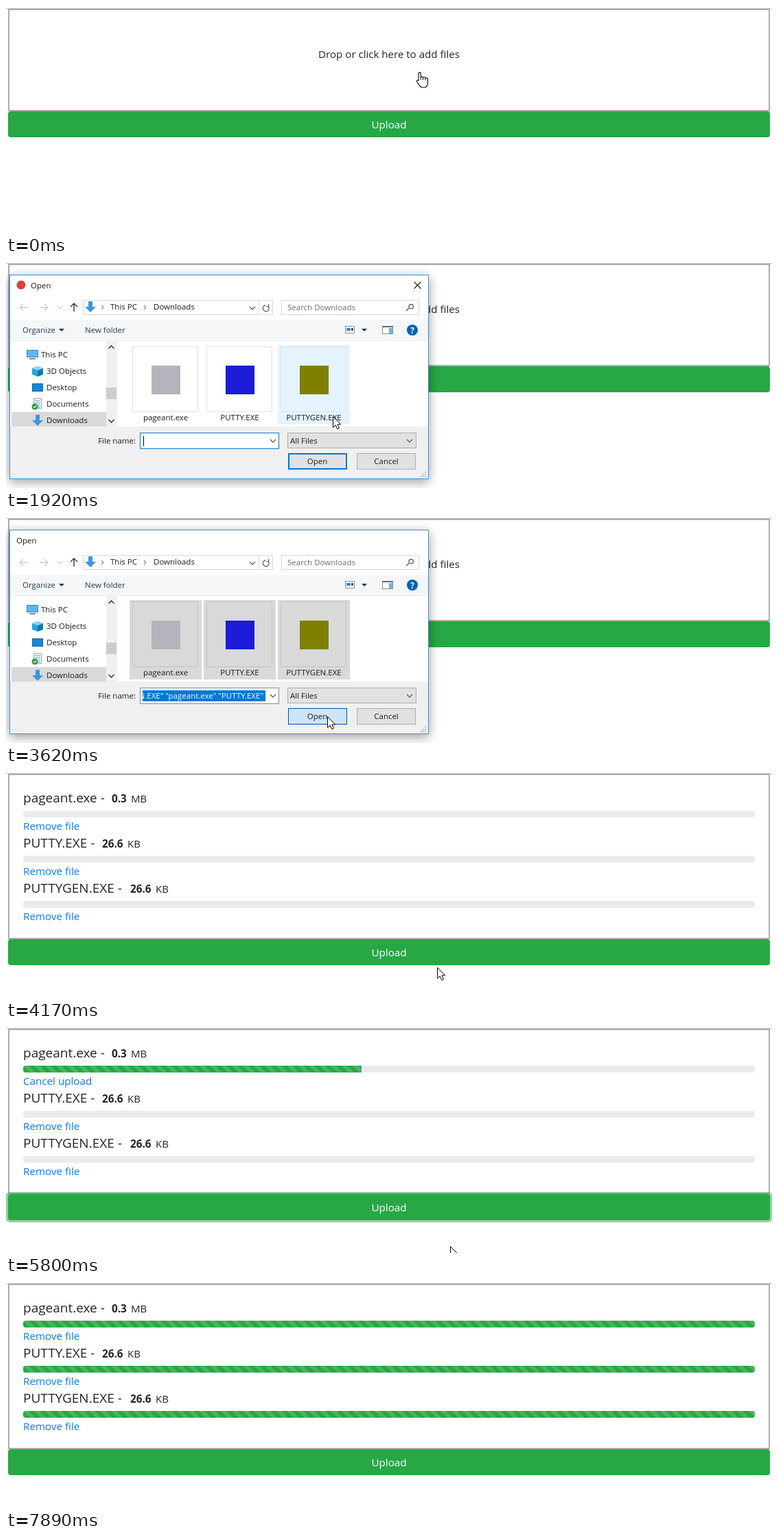
These frames come from a looping animation (1116 px wide and 332 px high, 7.97 s). An HTML page with a canvas:

```html
<!DOCTYPE html>
<html lang="en">
<head>
<meta charset="utf-8">
<title>File upload</title>
<style>
html, body { margin: 0; width: 100%; height: 100%; overflow: hidden; background: #fff; }
canvas { display: block; }
</style>
</head>
<body>
<canvas id="stage" width="1116" height="332"></canvas>
<script>
const LOOP = 7970, STEP = 77.4;
const BLUE = '#0078d7', GREEN = '#28a745', INK = '#1b1b1b', NAVY = '#1e395b';
const stage = document.getElementById('stage').getContext('2d');
const layer = document.createElement('canvas');
layer.width = 611;
layer.height = 299;
const dialogCtx = layer.getContext('2d');
let c = stage;

const clamp = v => Math.max(0, Math.min(1, v));
const ramp = (t, start, length) => clamp((t - start) / length);

// CSS "ease" timing curve
function ease(x) {
  let lo = 0, hi = 1, s = 0.5;
  for (let i = 0; i < 20; i++) {
    s = (lo + hi) / 2;
    const bx = 0.75 * s * (1 - s) + s ** 3;
    if (bx < x) lo = s; else hi = s;
  }
  return 0.3 * s * (1 - s) ** 2 + 3 * s * s * (1 - s) + s ** 3;
}

function rect(x, y, w, h, fill, border, line = 1) {
  if (border) {
    c.fillStyle = border;
    c.fillRect(x, y, w, h);
    x += line; y += line; w -= 2 * line; h -= 2 * line;
  }
  c.fillStyle = fill;
  c.fillRect(x, y, w, h);
}

function round(x, y, w, h, r, fill) {
  c.beginPath();
  c.roundRect(x, y, w, h, r);
  c.fillStyle = fill;
  c.fill();
}

function text(s, x, y, size, color = INK, align = 'left', weight = 400) {
  c.font = `${weight} ${size}px "Open Sans", "Noto Sans", sans-serif`;
  c.fillStyle = color;
  c.textAlign = align;
  c.fillText(s, x, y);
}
const label = (s, x, y, color, align) => text(s, x, y, 11.5, color, align);

function path(d, x, y, stroke, fill, width = 1) {
  const p = new Path2D(d);
  c.save();
  c.translate(x, y);
  c.lineWidth = width;
  if (fill) { c.fillStyle = fill; c.fill(p); }
  if (stroke) { c.strokeStyle = stroke; c.stroke(p); }
  c.restore();
}

function circle(x, y, r, fill) {
  c.beginPath();
  c.arc(x, y, r, 0, 7);
  c.fillStyle = fill;
  c.fill();
}

const chevron = (x, y, color = '#555') => path('M-4 -2L0 2L4 -2', x, y, color, null, 1.2);
const triangle = (x, y) => path('M-4 -2H4L0 2Z', x, y, null, NAVY);
const downArrow = (x, y) => path('M-3 -8H3V0H8L0 8L-8 0H-3Z', x, y, null, '#3a96dd');

// Pointer position over time: [ms, x, y]
const route = [
  [0, 602, 97], [1080, 602, 97], [1238, 578, 98], [1690, 480, 222], [1840, 480, 222],
  [2080, 469, 237], [2640, 469, 237], [2980, 472, 307], [3150, 468, 293], [3640, 468, 293],
  [4250, 634, 287], [4390, 634, 287], [4480, 632, 265], [5560, 632, 265], [5900, 650, 335], [LOOP, 650, 335]
];

function pointerAt(t) {
  const i = Math.max(1, route.findIndex(k => k[0] >= t));
  const [t0, x0, y0] = route[i - 1], [t1, x1, y1] = route[i];
  const k = ramp(t, t0, t1 - t0), s = k * k * (3 - 2 * k);
  return { x: Math.round(x0 + (x1 - x0) * s), y: Math.round(y0 + (y1 - y0) * s) };
}

function drawPointer(p, hand) {
  if (hand) {
    path('M-1.5 12V1.2Q0 -1 1.7 1.2V7Q3.5 5.6 5 7.4Q7 6.2 8.5 8.2Q10.5 7 12 9.5V16Q11.5 20 9 22H2.5' +
      'Q-1 19 -4 13.5Q-4.8 10.5 -1.5 12ZM1.7 7V11M5 7.5V11M8.5 8.5V11.5', p.x + 0.5, p.y, '#000', '#fff', 1.1);
  } else {
    path('M0.5 0.5V16.5L4.2 13L6.8 18.8L9.4 17.6L6.9 12H11.8Z', p.x, p.y, '#000', '#fff');
  }
}

function drawProgress(y, value) {
  c.save();
  c.beginPath();
  c.roundRect(25, y, 1066, 10, 4);
  c.clip();
  rect(25, y, 1066, 10, '#e9ecef');
  c.beginPath();
  c.rect(25, y, 1066 * value, 10);
  c.clip();
  rect(25, y, 1066, 10, GREEN);
  for (let x = 9; x < 1091; x += 16) path('M0 0H8L18 10H10Z', x, y, null, 'rgba(255,255,255,.15)');
  c.restore();
}

// name, size, unit, x of size and unit, "Cancel" link interval, bar start
const files = [
  ['pageant.exe', '0.3', 'MB', 154, 182, 5000, 6200, 5640],
  ['PUTTY.EXE', '26.6', 'KB', 140, 177, 6200, 6560, 6338],
  ['PUTTYGEN.EXE', '26.6', 'KB', 181, 218, 6560, 7150, 6607]
];

function drawPage(t) {
  const listed = t >= 3700, height = listed ? 242 : 150, top = 4 + height;
  rect(0, 0, 1116, 332, '#fff');
  rect(0, 3, 1116, 1, '#c4c4c4');
  rect(3, 4, 1110, height, '#fff', '#adadad', 2);
  if (listed) {
    files.forEach(([name, size, unit, sizeX, unitX, from, to, start], i) => {
      const y = 66 * i;
      text(name + ' -', 25, y + 46, 19, '#212529', 'left', 500);
      text(size, sizeX, y + 46, 15.3, '#212529', 'left', 700);
      text(unit, unitX, y + 46, 15, '#212529');
      drawProgress(y + 58, t < start ? 0 : ease(ramp(t, start, 600)));
      text(t >= from && t < to ? 'Cancel upload' : 'Remove file', 25, y + 86, 15.2, '#007bff');
    });
  } else {
    text('Drop or click here to add files', 558, 76, 15.1, '#212529', 'center');
  }
  const focus = ramp(t, 4850, 150) * (1 - ramp(t, 7740, 150));
  if (focus) round(-0.2, top - 3.2, 1116.4, 44.4, 6, `rgba(40,167,69,${focus / 2})`);
  const hover = ramp(t, 4340, 150) * (1 - ramp(t, 5650, 150));
  round(3, top, 1110, 38, 4, `rgb(${40 - 3 * hover},${167 - 12 * hover},${69 - 2 * hover})`);
  text('Upload', 558, top + 25, 15.2, '#fff', 'center');
}

function drawTitleAndBars(t, active) {
  if (active) {
    circle(22, 35, 6.5, '#db4437');
    path('M-5 -5L5 5M5 -5L-5 5', 599.5, 35.5, t < 1300 ? '#777' : '#222', null, 1.2);
  }
  label('Open', active ? 36 : 15, 40);

  path('M6 0H-6M-1 -5L-6 0L-1 5', 26, 68, '#ccc', null, 1.3);
  path('M-6 0H6M1 -5L6 0L1 5', 55, 68, '#ccc', null, 1.3);
  chevron(79, 68, '#ccc');
  path('M0 6V-6M-5 -1L0 -6L5 -1', 99, 68, '#444', null, 1.5);
  rect(112, 57, 277, 22, '#fff', '#d9d9d9');
  rect(368, 57, 1, 22, '#d9d9d9');
  downArrow(123, 67);
  for (const x of [141, 203]) path('M-2 -3L1 0L-2 3', x, 68, '#555');
  label('This PC', 152, 71);
  label('Downloads', 215, 71);
  chevron(359, 69);
  path('M3 -3A4.5 4.5 0 1 1 -1 -4.3M3.5 -6V-2.5H0', 379, 69, '#555', null, 1.2);
  rect(401, 57, 201, 22, '#fff', '#d9d9d9');
  label('Search Downloads', 410, 72, '#6d6d6d');
  path('M-5 5L-1 1M-1 -1.5A3.2 3.2 0 1 1 5.4 -1.5A3.2 3.2 0 1 1 -1 -1.5', 588, 68, '#555', null, 1.3);

  rect(6, 86, 609, 31, '#f5f6f7');
  rect(6, 116, 609, 1, '#ececec');
  label('Organize', 24, 105, NAVY);
  triangle(81, 101);
  label('New folder', 115, 105, NAVY);
  rect(494, 95, 14, 11, '#fff', '#8a9099');
  rect(496, 98, 6, 4, '#3f86c6');
  rect(503, 98, 3, 4, '#555');
  triangle(522, 101);
  rect(548, 95, 16, 12, '#fff', '#8a9099');
  rect(548, 95, 16, 2, '#5b6b7d');
  rect(558, 98, 5, 8, '#6db3ea');
  if (t >= 1150 && t < 1330) rect(578, 88, 28, 26, '#d8eafb', '#99cbf3');
  circle(592, 101, 8, '#0063b8');
  text('?', 592, 105.5, 12, '#fff', 'center', 700);
}

function drawTree(t) {
  rect(8, 221, 138, 21, '#d9d9d9');
  rect(146, 117, 16, 125, '#f0f0f0');
  rect(146, 185, 15, 17, '#cdcdcd');
  path('M-4 2L0 -2L4 2', 153.5, 126, '#444', null, 1.6);
  path('M-4 -2L0 2L4 -2', 153.5, 234, '#444', null, 1.6);
  rect(30, 130, 17, 11, '#5bb9ef', '#4387b5');
  rect(34, 142, 9, 2, '#7a8b99');
  path('M0 -7L8 -4V5L0 8L-8 5V-4Z', 46, 161, null, '#25a5dc');
  path('M0 -1L8 -4V5L0 8Z', 46, 161, null, '#117ba8');
  path('M0 -7L8 -4L0 -1L-8 -4Z', 46, 161, null, '#86d5f4');
  rect(38, 179, 16, 12, '#1787d8', '#0b67ab');
  rect(40, 201, 12, 15, '#fff', '#8aa0b3');
  for (let y = 204; y < 214; y += 3) rect(42, y, 8, 1, '#5a93c4');
  if (t >= 1300) {
    circle(42, 213, 4.5, '#2d9b48');
    path('M-2 0L-0.5 1.7L2.2 -1.5', 42, 213, '#fff', null, 1.2);
  }
  downArrow(46, 233);
  label('This PC', 51, 141);
  ['3D Objects', 'Desktop', 'Documents', 'Downloads'].forEach((s, i) => label(s, 59, 165 + 24 * i));
}

function drawFiles(t, active) {
  const icons = ['#b4b4bc', '#1c1cd8', '#808000'];
  files.forEach(([name], i) => {
    const x = 180 + 108 * i, last = i === 2;
    const selected = t >= 2380 || (last && t >= 2150);
    const hovered = last && t >= 1500;
    const tint = !active ? '#d9d9d9' : selected ? '#cce8ff' : hovered ? '#e5f3ff' : '#fff';
    rect(x, 123, 105, 116, tint, selected && last && active ? '#99d1ff' : null);
    rect(x + 4, 125, 96, 96, tint, !active ? '#c2c2c2' : selected ? '#b3d3ea' : '#e2e2e2');
    rect(x + 32, 153, 42, 42, icons[i]);
    label(name, x + 52.5, 233, INK, 'center');
  });
}

function drawFooter(t, active, p) {
  rect(6, 242, 609, 76, '#f0f0f0');
  label('File name:', 189, 267, INK, 'right');
  rect(195, 251, 203, 24, '#fff', t < 2100 ? BLUE : '#8a8a8a');
  c.save();
  c.beginPath();
  c.rect(198, 253, 181, 20);
  c.clip();
  if (t < 2100) rect(200, 256, 1, 15, '#000');
  else if (t < 2380) label('PUTTYGEN.EXE', 199, 267);
  else if (active) label('"PUTTYGEN.EXE" "pageant.exe" "PUTTY.EXE"', 199, 267);
  else {
    rect(199, 255, 179, 16, BLUE);
    label('"PUTTYGEN.EXE" "pageant.exe" "PUTTY.EXE"', 375, 267, '#fff', 'right');
  }
  c.restore();
  chevron(389, 263);

  const overFilter = p.x > 410 && p.x < 598 && p.y > 251 && p.y < 275;
  rect(410, 251, 188, 23, overFilter ? '#e5f1fb' : '#e1e1e1', overFilter ? BLUE : '#adadad');
  label('All Files', 414, 267);
  chevron(588, 263);

  const pressed = t >= 3230;
  const overOpen = p.x > 411 && p.x < 497 && p.y > 281 && p.y < 305;
  rect(411, 281, 86, 24, pressed ? '#cce4f7' : overOpen ? '#e5f1fb' : '#e1e1e1',
    pressed ? '#005499' : BLUE, pressed || overOpen ? 1 : 2);
  label('Open', 453.5, 297, INK, 'center');
  rect(511, 281, 86, 24, '#e1e1e1', '#adadad');
  label('Cancel', 554, 297, INK, 'center');
  for (let i = 0; i < 3; i++)
    for (let j = 0; j <= i; j++) rect(610 - 3 * j, 308 + 3 * i, 2, 2, '#bdbdbd');
}

function drawDialog(t, p) {
  const alpha = ramp(t, 1050, 200) * (1 - ramp(t, 3640, 200));
  if (!alpha) return;
  const active = t < 3550;
  c = dialogCtx;
  c.setTransform(1, 0, 0, 1, -5, -20);
  rect(5, 20, 611, 299, '#fff', '#3c93d6');
  drawTitleAndBars(t, active);
  drawTree(t);
  drawFiles(t, active);
  drawFooter(t, active, p);

  c = stage;
  c.save();
  c.globalAlpha = alpha;
  c.shadowColor = 'rgba(0,0,0,.4)';
  c.shadowBlur = 16;
  c.shadowOffsetY = 4;
  const scale = alpha > 0.9 ? 1 : 0.9 + alpha / 9;
  c.translate(310.5, 169.5);
  c.scale(scale, scale);
  c.drawImage(layer, -305.5, -149.5);
  c.restore();
}

function frame(now) {
  const t = Math.floor((now % LOOP + 24) / STEP) * STEP;
  const p = pointerAt(Math.min(t, LOOP));
  drawPage(t);
  drawDialog(t, p);
  if (p.y < 332) drawPointer(p, t < 760 || (t >= 4400 && p.y < 284));
  requestAnimationFrame(frame);
}

const begin = performance.now();
requestAnimationFrame(function start() { frame(performance.now() - begin); });
</script>
</body>
</html>
```
